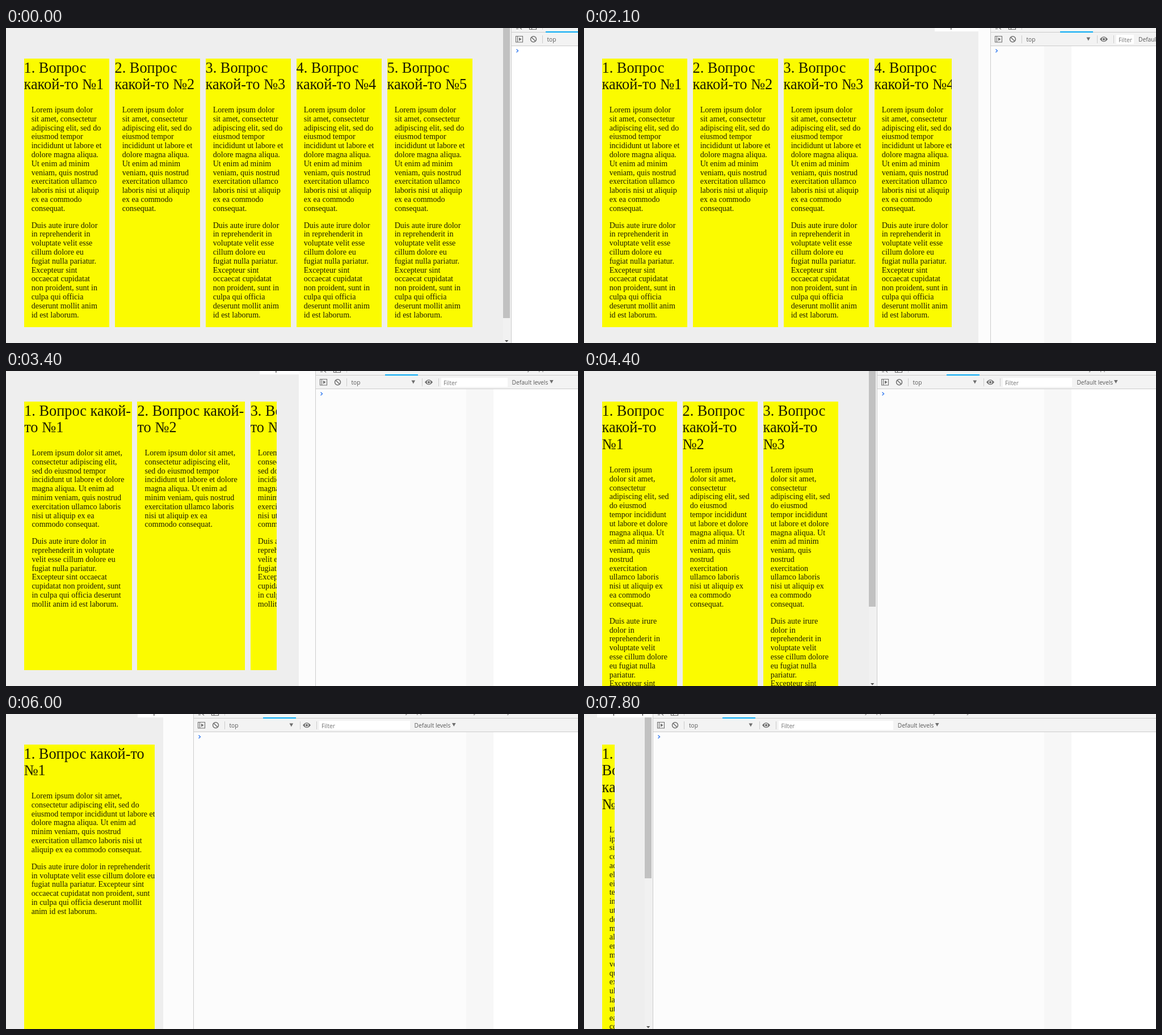
These frames come from a looping animation (1008 by 556 pixels, 8 s). An HTML page:

```html
<!DOCTYPE html>
<html lang="ru">
<head>
<meta charset="utf-8">
<title>Responsive slider</title>
<style>
html, body { margin: 0; width: 100%; height: 100%; overflow: hidden; }
#stage { position: relative; width: 1008px; height: 556px; overflow: hidden; background: #fff; }
#stage.worn { background: linear-gradient(90deg, #fcfcfc 811px, #f7f7f7 811px 859px, #fff 859px); }
#stage div, #stage svg, #stage span { position: absolute; }
#page { left: 0; top: 0; height: 556px; overflow: hidden; background: #eee; }
#list { left: 31px; top: 54px; height: 502px; overflow: hidden; }
.card { top: 0; background: #fbfb00; color: #1c1c00; white-space: nowrap; overflow: hidden;
  font-family: "Liberation Serif", "Times New Roman", serif; }
.card h2 { margin: 0 0 21.8px; padding-top: 1.6px; font-weight: 400; font-size: 26.34px; line-height: 29.85px; }
.card p { margin: 0 0 14.05px 13.2px; font-size: 14.05px; line-height: 15.8px; }
#bar { top: 0; width: 14px; height: 556px; background: #f1f1f1; }
#thumb { left: 0; top: 0; width: 12px; }
#bar svg { left: 3px; top: 551px; }
#size { top: 0; width: 98px; height: 6px; overflow: hidden; background: #fff; color: #222; }
#size span { left: 5px; top: -15px; font: 13px/20px "Open Sans", sans-serif; white-space: nowrap; }
#tools { top: 0; width: 1008px; height: 556px; border-left: 1px solid #ccc; box-sizing: border-box;
  font: 10.2px/14px "Open Sans", sans-serif; color: #5a5a5a; white-space: nowrap; }
#tabs { left: 0; top: 0; width: 100%; height: 7px; overflow: hidden; background: #f3f3f3; border-bottom: 1px solid #ccc; }
#tabs span { top: -12px; }
#mark { top: 6px; width: 58px; height: 2px; background: #03a9f4; }
#row { left: 0; top: 8px; width: 100%; height: 23px; background: #f3f3f3; border-bottom: 1px solid #ccc; }
#row span { top: 5px; }
#field { left: 221px; top: 4px; height: 16px; background: #fff; overflow: hidden; }
#field span { left: 4px; top: 2px; color: #757575; }
#art { left: 0; top: 0; }
#drop { top: 8px; }
</style>
</head>
<body>
<div id="stage">
  <div id="page">
    <div id="list"></div>
    <div id="bar">
      <div id="thumb"></div>
      <svg width="7" height="4"><path d="M0 0h6.4l-3.2 3.4z" fill="#505050"/></svg>
    </div>
    <div id="size"><span></span></div>
  </div>
  <div id="tools">
    <div id="tabs">
      <span style="left:338px">Memory</span>
      <span style="left:386px">Application</span>
      <span style="left:460px">Security</span>
      <span style="left:552px">y</span>
    </div>
    <div id="row">
      <span style="left:62.5px">top</span>
      <div id="field"><span>Filter</span></div>
      <span id="levels">Default levels</span>
      <svg id="drop" width="7" height="6"><path d="M0 0h6.6l-3.3 6z" fill="#6e6e6e"/></svg>
    </div>
    <div id="mark"></div>
    <svg id="art" width="240" height="60" fill="none" stroke="#6e6e6e">
      <path d="M31.5 0v2.5h12V0M35.5 0v2M8 1.5h4M15 0l3 2.5" stroke-width="1.2"/>
      <path d="M54.5 0v3M54.5 13v14M187.5 13v14M216.5 13v14" stroke="#ccc"/>
      <path d="M7.5 14.5h12v10.5h-12zM10.5 14.5v10.5" stroke-width="1.1"/>
      <path d="M13 16.8l4.5 3-4.5 3z" fill="#6e6e6e" stroke="none"/>
      <circle cx="38.5" cy="19.8" r="5" stroke-width="1.5"/>
      <path d="M35 16.3l7 7" stroke-width="1.5"/>
      <path d="M168.5 16.5h6.6l-3.3 6z" fill="#6e6e6e" stroke="none"/>
      <path d="M192 19.8Q199 10.8 206 19.8Q199 28.8 192 19.8z" fill="#6e6e6e" stroke="none"/>
      <circle cx="199" cy="19.8" r="2.7" fill="#6e6e6e" stroke="#f3f3f3" stroke-width="1.2"/>
      <path d="M8.5 37.5l3 2.8-3 2.8" stroke="#367cf1" stroke-width="1.4"/>
    </svg>
  </div>
</div>
<script>
const LOOP = 8000, STEP = 100, START = 890;
const $ = id => document.getElementById(id);

const first = ('Lorem ipsum dolor sit amet, consectetur adipiscing elit, sed do eiusmod tempor ' +
  'incididunt ut labore et dolore magna aliqua. Ut enim ad minim veniam, quis nostrud ' +
  'exercitation ullamco laboris nisi ut aliquip ex ea commodo consequat.').split(' ');
const second = ('Duis aute irure dolor in reprehenderit in voluptate velit esse cillum dolore eu ' +
  'fugiat nulla pariatur. Excepteur sint occaecat cupidatat non proident, sunt in culpa qui ' +
  'officia deserunt mollit anim id est laborum.').split(' ');

// Digits in p1 and p2 are the words on each line.
const layouts = [
  { at: 0, edge: START, n: 5, x: 31.5, h: 474, thumb: 512, head: '#. Вопрос|какой-то №#',
    p1: '334243432431', p2: '43333224333' },
  { at: 2500, edge: 688.4, n: 3, x: 32.2, h: 474, thumb: 512, head: '#. Вопрос какой-|то №#',
    p1: '534554352', p2: '53533455' },
  { at: 3700, edge: 516, n: 3, x: 31.5, h: 640, thumb: 416, head: '#. Вопрос|какой-то|№#',
    p1: '2313224332112421', p2: '32223312222443' },
  { at: 5500, edge: 345, n: 1, x: 31.5, h: 640, thumb: 450, head: '#. Вопрос какой-то|№#',
    p1: '5566455', p2: '675564' },
  { at: 6500, edge: 196, n: 1, x: 31.5, h: 900, thumb: 290, head: '#.|Вопрос|какой-то|№#',
    p1: '122113111311221121123111', p2: '' }
];

// Each drag: start time, then the divider position at every step.
const drags = [
  [1700, 888.4, 859, 811, 756, 716, 695, 688.4],
  [3200, 672, 610, 545, 516],
  [5000, 500, 430, 366, 345],
  [6000, 330, 277, 215, 196],
  [7500, 182, 152, 129, 121.4]
];
const badge = [[1800, 4400], [5100, 7100], [7600, LOOP]];

const rightOf = edge => edge - 67.7;

function wrap(words, counts) {
  let i = 0;
  return '<p>' + [...counts].map(c => words.slice(i, i += +c).join(' ')).join('<br>') + '</p>';
}

function build(l) {
  const gap = 9.2, pitch = (rightOf(l.edge) - l.x + gap) / l.n;
  let html = '';
  for (let k = 0; k < 5; k++) {
    const title = l.head.replaceAll('#', k + 1).replaceAll('|', '<br>');
    html += `<div class="card" style="left:${l.x - 31 + k * pitch}px;width:${pitch - gap}px;height:${l.h}px">` +
      `<h2>${title}</h2>${wrap(first, l.p1)}${k === 1 ? '' : wrap(second, l.p2)}</div>`;
  }
  $('list').innerHTML = html;
}

// While dragging, the page is already cut to the next divider position.
function divider(t) {
  let edge = START, cut = START;
  for (const [at, ...pos] of drags) {
    if (t < at) break;
    const i = Math.min(Math.floor((t - at) / STEP), pos.length - 1);
    edge = pos[i];
    cut = pos[Math.min(i + 1, pos.length - 1)];
  }
  return { edge, cut };
}

function thumbColor(t) {
  if (t >= 300 && t < 600) return '#a8a8a8';
  return t >= 200 && t < 700 ? '#b4b4b4' : '#c1c1c1';
}

function place(id, left, width) {
  $(id).style.left = left + 'px';
  if (width !== undefined) $(id).style.width = width + 'px';
}

let shown = null;
function draw(t) {
  const { edge, cut } = divider(t);
  const layout = layouts.filter(l => t >= l.at).pop();
  if (layout !== shown) build(shown = layout);

  $('stage').className = edge < 811 ? 'worn' : '';
  place('page', 0, cut);
  place('list', 31, Math.max(0, rightOf(edge) - 31));
  place('bar', edge - 14);
  $('thumb').style.height = layout.thumb + 'px';
  $('thumb').style.background = thumbColor(t);

  place('size', edge - 98);
  $('size').style.display = badge.some(([a, b]) => t >= a && t < b) ? '' : 'none';
  $('size').firstChild.textContent = Math.round(edge / 0.878) + 'px × 694px';

  const room = 1008 - edge;
  const field = Math.max(31, Math.min(24 + room * 0.2, room - 289));
  place('tools', edge);
  place('mark', room < 200 ? 60 : 122);
  place('field', 221, field);
  place('levels', 229 + field);
  place('drop', 295 + field);
}

function tick(now) {
  draw(now % LOOP);
  requestAnimationFrame(tick);
}
draw(0);
requestAnimationFrame(tick);
</script>
</body>
</html>
```
